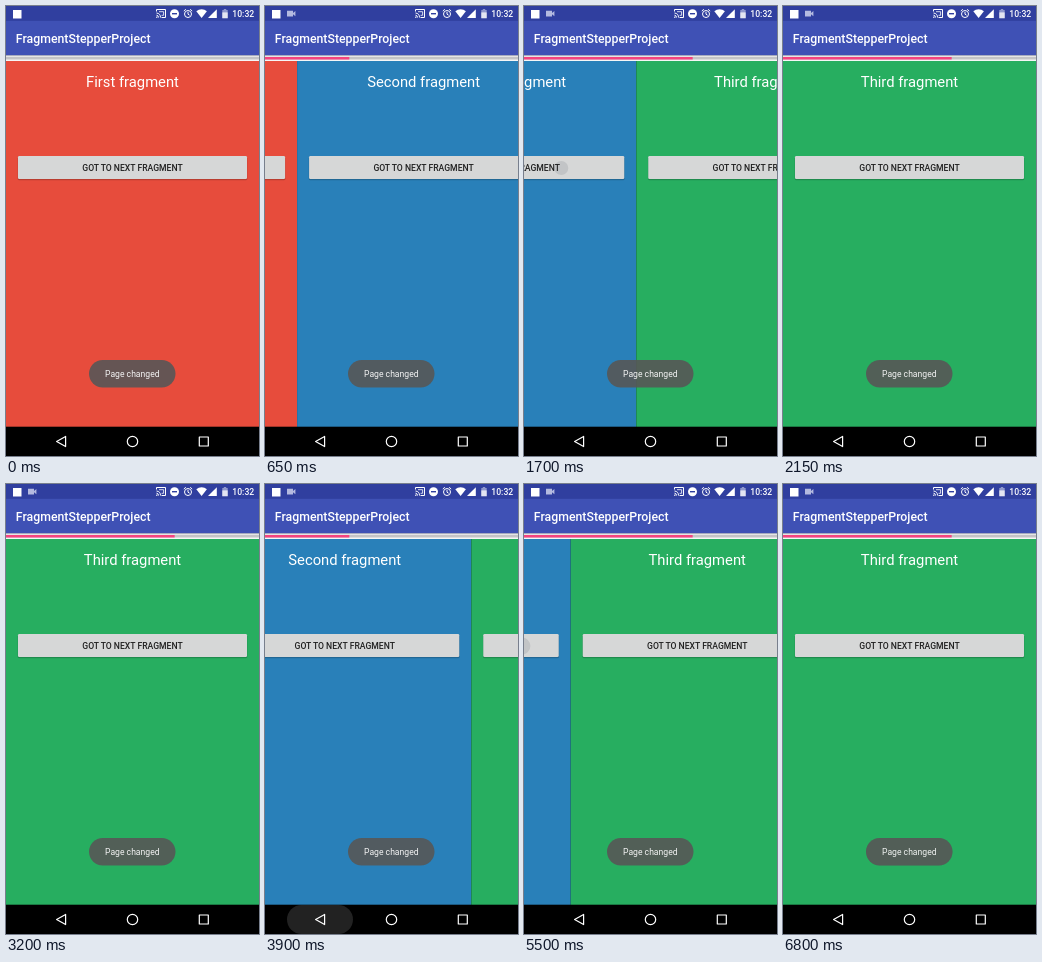
These frames come from a looping animation (253x450 px, 6.85 s). An HTML page:

```html
<!DOCTYPE html>
<html lang="en">
<head>
<meta charset="utf-8">
<title>Fragment stepper</title>
<style>
  html, body { margin: 0; width: 100%; height: 100%; overflow: hidden; background: #000; }
  svg { display: block; width: 253px; height: 450px; font-family: Roboto, sans-serif; }
  .medium { font-weight: 500; }
  .mid { text-anchor: middle; }
  .line { fill: none; stroke: #fff; }
</style>
</head>
<body>
<svg viewBox="0 0 253 450">
  <defs>
    <linearGradient id="shade" x2="0" y2="1">
      <stop offset="0" stop-color="#000" stop-opacity=".28"/>
      <stop offset="1" stop-color="#000" stop-opacity="0"/>
    </linearGradient>
    <clipPath id="buttonClip"><rect x="12" y="150" width="229" height="23" rx="1.3"/></clipPath>
    <g id="pill">
      <rect x="83" y="354" width="86.5" height="27.5" rx="13.75" fill="#575757" fill-opacity=".9"/>
      <text class="mid" x="126.3" y="371" font-size="8.62" fill="#f4f4f4">Page changed</text>
    </g>
  </defs>

  <g id="pages"></g>

  <!-- step progress -->
  <rect y="49" width="253" height="6" fill="#f6f6f6"/>
  <rect y="51" width="253" height="2.5" fill="#c3c3c6"/>
  <rect id="bar" y="51" width="0" height="2.5" fill="#f5437f"/>
  <rect y="49" width="253" height="2" fill="url(#shade)"/>

  <!-- app bar -->
  <rect width="253" height="49.2" fill="#3f51b5"/>
  <rect width="253" height="14.8" fill="#303f9f"/>
  <text class="medium" x="9.85" y="36.8" font-size="12.3" fill="#fff">FragmentStepperProject</text>

  <!-- status icons -->
  <rect x="7" y="4" width="8.5" height="8.5" fill="#fff"/>
  <path id="camera" d="M22 4.8h6v2.1l2.4-2v5.4l-2.4-2v2.1h-6z" fill="#b4bae0"/>
  <g class="line" stroke-width="1">
    <path d="M150.5 5.5v-2h9v8h-4M150.5 7a4.5 4.5 0 0 1 4 4.5M150.5 9.2a2.3 2.3 0 0 1 2 2.3"/>
    <path d="M153 5.7h4.6v3.6h-2" stroke-width=".8"/>
    <circle cx="182" cy="8" r="3.5"/>
    <path d="M182 5.8v2.4l1.6 1M177.8 5l2-1.7M186.2 5l-2-1.7"/>
  </g>
  <circle cx="150.8" cy="11.2" r=".7" fill="#fff"/>
  <circle cx="168.5" cy="7.7" r="4.5" fill="#fff"/>
  <rect x="166" y="7" width="5" height="1.4" fill="#303f9f"/>
  <path d="M190.3 5.3a8 8 0 0 1 10.6 0l-5.3 6.7z" fill="#fff"/>
  <path d="M202 12l8.8-8.8v8.8z" fill="#fff"/>
  <path d="M216.3 4h1.5v-1h2.4v1h1.5v8.2h-5.4z" fill="#8f98cd"/>
  <path d="M216.3 6.4h5.4v5.8h-5.4z" fill="#fff" fill-opacity=".75"/>
  <text class="medium" x="248.2" y="11" font-size="8.62" fill="#fff" text-anchor="end">10:32</text>

  <use id="toastOut" href="#pill"/>
  <use id="toastIn" href="#pill"/>

  <!-- navigation bar -->
  <rect y="420.7" width="253" height="29.3" fill="#000"/>
  <rect id="backGlow" x="22" y="421" width="66" height="29" rx="14.5" fill="#fff"/>
  <g class="line" stroke-width="1.2" stroke-linejoin="round">
    <path d="M50.6 435.5l9-5.1v10.2z"/>
    <circle cx="126.5" cy="435.5" r="5.2"/>
    <rect x="193.3" y="431" width="9" height="9"/>
  </g>
</svg>
<script>
const W = 253, LOOP = 6850, SLIDE = 600, FADE = 500;
const PAGES = [["First", "#e74c3c"], ["Second", "#2980b9"], ["Third", "#27ae60"]];
// touch: x of the tap inside the button; the back key has none
const MOVES = [
  { at: 448, from: 0, to: 1, touch: 185 },
  { at: 1611, from: 1, to: 2, touch: 178 },
  { at: 3729, from: 2, to: 1 },
  { at: 5329, from: 1, to: 2, touch: 204 }
];
const TOASTS = [700, 2700, 4700, 6700];

const el = id => document.getElementById(id);
const clamp = v => Math.min(1, Math.max(0, v));
const easeOut = u => 1 - (1 - u) ** 5;

el("pages").innerHTML = PAGES.map(([name, color]) => `
  <g class="page">
    <rect y="54.5" width="${W}" height="367" fill="${color}"/>
    <text class="mid" x="126.5" y="81" font-size="14.77" fill="#fff">${name} fragment</text>
    <rect x="11.7" y="150.5" width="229.6" height="23.8" rx="1.5" fill="#000" fill-opacity=".2"/>
    <rect x="12" y="150" width="229" height="23" rx="1.3" fill="#d6d7d7"/>
    <g clip-path="url(#buttonClip)"><circle class="ripple" cy="162" fill="#142032"/></g>
    <text class="medium mid" x="126.5" y="165" font-size="8.62" fill="#212121">GOT TO NEXT FRAGMENT</text>
  </g>`).join("");
const pages = document.querySelectorAll(".page");
const ripples = document.querySelectorAll(".ripple");

function drawPages(t) {
  const move = MOVES.filter(m => t >= m.at).pop();
  const pos = move
    ? move.from + (move.to - move.from) * easeOut(clamp((t - move.at) / SLIDE))
    : 0;
  pages.forEach((page, i) => page.setAttribute("transform", `translate(${(i - pos) * W} 0)`));
  el("bar").setAttribute("width", (move ? move.to : 0) * W / 3);
}

function drawRipples(t) {
  ripples.forEach(r => r.setAttribute("opacity", 0));
  for (const m of MOVES) {
    const age = t - m.at + 110;
    if (!m.touch || age < 0 || age > 560) continue;
    const ripple = ripples[m.from];
    ripple.setAttribute("cx", m.touch);
    ripple.setAttribute("r", 3 + age * 0.02);
    ripple.setAttribute("opacity", 0.1 * clamp(age / 60) * clamp((560 - age) / 250));
  }
}

function drawBackGlow(t) {
  const age = t - 3690;
  const grow = 0.8 + 0.2 * easeOut(clamp(age / 200));
  const glow = el("backGlow");
  glow.setAttribute("transform", `translate(55 435.5) scale(${grow}) translate(-55 -435.5)`);
  glow.setAttribute("opacity", age < 0 ? 0 : 0.135 * clamp(age / 80) * clamp((620 - age) / 400));
}

function drawToast(t) {
  const start = TOASTS.filter(s => t >= s).pop();
  const u = start === undefined ? 1 : clamp((t - start) / FADE);
  el("toastOut").setAttribute("opacity", 1 - u * u);
  el("toastIn").setAttribute("opacity", 1 - (1 - u) ** 2);
}

function draw(t) {
  drawPages(t);
  drawRipples(t);
  drawBackGlow(t);
  drawToast(t);
  el("camera").setAttribute("opacity", t < 50 ? 0 : 1);
}

const begin = performance.now();
function tick() {
  draw((performance.now() - begin) % LOOP);
  requestAnimationFrame(tick);
}
tick();
</script>
</body>
</html>
```
